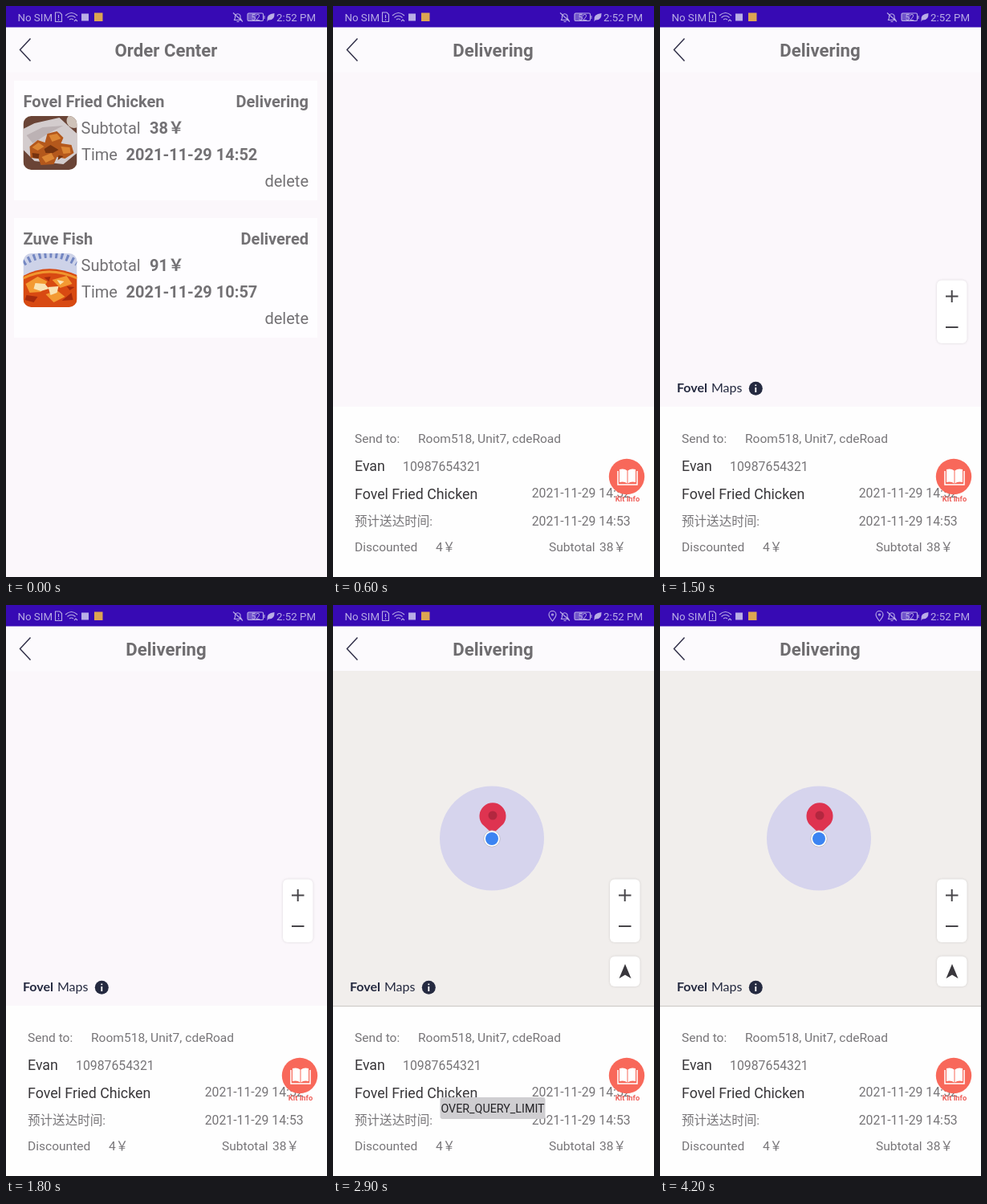
An HTML page that plays this animation: 400x711 px, repeating every 4.3 s.

```html
<!DOCTYPE html>
<html lang="en">
<head>
<meta charset="utf-8">
<title>Order tracking</title>
<style>
  html, body { margin: 0; height: 100%; overflow: hidden; background: #fbf7fb; }
  svg { display: block; width: 400px; height: 711px; font: 15.56px Roboto, "Noto Sans CJK SC", "Noto Sans CJK", sans-serif; fill: #777578; }
  text { white-space: pre; }
  .title { font-size: 22.2px; font-weight: 700; text-anchor: middle; fill: #6f6d70; }
  .card { font-size: 20px; fill: #737174; }
  .card rect { fill: #fefdff; }
  .bold { font-weight: 700; }
  .end { text-anchor: end; }
  .name { font-size: 17.8px; fill: #39373a; }
  .digits { font-size: 15.8px; }
  .status { font-size: 13.3px; fill: #b9ade6; }
  .line { fill: none; stroke: #b9ade6; stroke-width: 1.1; }
  .button { fill: #fff; filter: drop-shadow(0 0 1.5px #0002); }
</style>
</head>
<body>
<svg viewBox="0 0 400 711">
  <defs>
    <clipPath id="thumb"><rect width="67" height="67" rx="10"/></clipPath>
    <pattern id="grid" x="30.5" y="90" width="35.55" height="35.55" patternUnits="userSpaceOnUse">
      <path d="M.5 0V36M0 .5H36" stroke="#dedae0" fill="none"/>
    </pattern>
    <g id="chicken">
      <path d="M0 0H67V67H0z" fill="#6a4436"/>
      <path d="M0 16L14 9L45 2L58 14L67 22V46L50 60L14 56L0 42z" fill="#d3cccd"/>
      <path d="M4 24L24 14L50 12L34 20L12 34z" fill="#bcb2b4"/>
      <circle cx="63" cy="6" r="9" fill="#cfc2b8"/>
      <path d="M8 38L18 30L27 33L30 22L42 19L50 27L47 34L60 36L63 46L52 53L42 51L38 60L22 61L19 53L9 52z" fill="#b4581c"/>
      <path d="M11 39L19 33L26 38L18 43zM32 24L42 22L47 28L36 32zM47 38L58 39L59 46L50 47zM23 51L35 46L39 53L28 58z" fill="#dc8634"/>
      <path d="M26 41L34 36L44 42L37 46L28 46zM11 46L20 47L19 53L12 52zM44 49L50 50L43 55z" fill="#76330f"/>
    </g>
    <g id="fish">
      <path d="M0 0H67V67H0z" fill="#cdd2e8"/>
      <path d="M0 12Q33 -9 67 12" fill="none" stroke="#7487c2" stroke-width="8" stroke-dasharray="3 4"/>
      <path d="M0 28Q30 11 67 27V67H0z" fill="#d84a12"/>
      <path d="M0 31Q32 15 67 31" fill="none" stroke="#f0962e" stroke-width="3"/>
      <path d="M3 38L18 29L30 35L22 48L8 49zM36 33L54 28L61 38L46 43zM28 51L42 46L52 54L38 61z" fill="#f39a32"/>
      <path d="M15 37L27 38L32 44L22 47L13 44zM31 42L44 41L42 49L34 52zM42 33L51 35L46 39z" fill="#f9e3b4"/>
      <path d="M4 52L18 54L13 61L2 58zM48 59L60 49L62 58zM26 30L34 29L32 35zM54 41L64 42L58 46z" fill="#a62a0c"/>
    </g>
  </defs>

  <path d="M0 0H400V711H0z" fill="#fbf7fb"/>
  <path d="M0 26H400V82.500H0z" fill="#fcfafd"/>

  <g data-to="600">
    <text class="title" x="199.5" y="63">Order Center</text>
    <g id="cards"></g>
  </g>

  <g data-from="600">
    <text class="title" x="199.5" y="63">Delivering</text>
    <path data-from="800" data-to="1400" d="M0 83H400V499H0z" fill="url(#grid)"/>
    <g data-from="2000">
      <path d="M0 82H400V499H0z" fill="#f1eeec"/>
      <circle cx="198" cy="290.5" r="65" fill="#d6d4ed"/>
      <path d="M199 285L186 273A16.5 16.5 0 1 1 212 273z" fill="#de3350"/>
      <circle cx="199" cy="262" r="5.5" fill="#b3273f"/>
      <circle cx="198" cy="291" r="10.2" fill="#fff" stroke="#b9b5bd" stroke-width=".8"/>
      <circle cx="198" cy="291" r="8" fill="#3b84f2"/>
      <rect class="button" x="345" y="437.5" width="37.5" height="37.5" rx="6"/>
      <path d="M364 447L371.5 465L364 460.5L356.5 465z" fill="#39373c"/>
    </g>
    <g data-from="1400">
      <rect class="button" x="345" y="341.5" width="37.5" height="78.5" rx="6"/>
      <path d="M356 361.5H371.5M363.7 354V369M356 400H371.5" stroke="#48464a" stroke-width="2"/>
      <g font-family="Lato, sans-serif" font-size="16" fill="#252a40">
        <text class="bold" x="21" y="481">Fovel</text><text x="64" y="481">Maps</text>
      </g>
      <circle cx="119.3" cy="476.3" r="8.5" fill="#252a40"/>
      <path d="M119.3 475V481M119.3 471.5V473.3" stroke="#fff" stroke-width="1.8"/>
    </g>

    <path d="M0 499H400V711H0z" fill="#fefefe"/>
    <path data-from="2000" d="M0 499.5H400" stroke="#cac7c3"/>
    <text x="27" y="544">Send to:</text><text x="106" y="544">Room518, Unit7, cdeRoad</text>
    <text class="name" x="27" y="579">Evan</text><text class="digits" x="87" y="578.5">10987654321</text>
    <text class="name" x="27" y="614">Fovel Fried Chicken</text><text class="digits" x="247.7" y="612">2021-11-29 14:52</text>
    <text x="27" y="647">预计送达时间:</text><text class="digits" x="247.7" y="647">2021-11-29 14:53</text>
    <text x="27" y="679">Discounted</text><text x="128" y="679">4￥</text>
    <text x="269" y="679">Subtotal</text><text x="332" y="679">38￥</text>

    <circle cx="366" cy="586" r="22.2" fill="#f8685a"/>
    <path d="M355 579V596H379V579" fill="none" stroke="#fff" stroke-width="1.5"/>
    <path d="M357 577Q363 575.5 366.5 578.5V594.5Q363 591.5 357 593zM377 577Q371 575.5 367.5 578.5V594.5Q371 591.5 377 593z" fill="#fff"/>
    <text class="bold" x="367" y="617" font-size="9.3" text-anchor="middle" fill="#ee5f5a">Kit Info</text>

    <g data-from="2600" data-to="4100">
      <rect x="133.5" y="613" width="131" height="27" rx="3" fill="#cfced1"/>
      <text x="199" y="632" font-size="14.3" text-anchor="middle" fill="#242326">OVER_QUERY_LIMIT</text>
    </g>
  </g>

  <path d="M30.5 40.5L17.5 54.5L30.5 68.5" fill="none" stroke="#33314a" stroke-width="1.5"/>

  <path d="M0 0H400V26.5H0z" fill="#370ab4"/>
  <g class="status">
    <text x="14.5" y="18.5">No SIM</text>
    <text class="end" x="386" y="18.5">2:52 PM</text>
    <path d="M94 9.5H103V18.5H94z"/>
    <path d="M325.5 18Q324 10 334.5 9Q335 18 327 17.5L325 19.5z"/>
    <path d="M301 9H311.500V18.5H301z" opacity=".45"/>
    <text x="311" y="17.5" font-size="10" text-anchor="middle">52</text>
    <g class="line">
      <path d="M61.5 8H67L69.5 10.5V19.5H61.5zM65.5 11V15M65.5 16.500V18"/>
      <path d="M74 12Q81.5 5 89 12M76.5 14.5Q81.5 10 86.5 14.5M79 17Q81.5 15 84 17"/>
      <path d="M85 19L87 17L89 19"/>
      <path d="M284.5 17.5H293.5L292 15V12A3.5 3.5 0 0 0 285.5 12V15zM287.5 19.5H290.5M283 8.5L295 19.5"/>
      <rect x="301" y="9" width="19.5" height="9.5" rx="1.5"/><path d="M322 12V16"/>
      <g data-from="2000">
        <path d="M273.5 20Q269 14.5 269 12A4.5 4.5 0 0 1 278 12Q278 14.5 273.5 20z"/>
        <circle cx="273.5" cy="12" r="1"/>
      </g>
    </g>
    <path d="M110 8.5H120.5V19H110z" fill="#dca552"/>
  </g>
</svg>
<script>
const card = (y, shop, state, price, time, photo) => `
  <g class="card" transform="translate(0 ${y})">
    <rect x="10" width="378" height="149"/>
    <text class="bold" x="21.5" y="33">${shop}</text>
    <text class="bold end" x="377" y="33">${state}</text>
    <g transform="translate(21.5 44)" clip-path="url(#thumb)"><use href="#${photo}"/></g>
    <text x="93.5" y="66">Subtotal</text><text class="bold" x="179" y="66">${price}￥</text>
    <text x="94" y="99">Time</text><text class="bold" x="149.5" y="99">2021-11-29 ${time}</text>
    <text class="end" x="377" y="132">delete</text>
  </g>`;

document.getElementById('cards').innerHTML =
  card(93, 'Fovel Fried Chicken', 'Delivering', 38, '14:52', 'chicken') +
  card(264, 'Zuve Fish', 'Delivered', 91, '10:57', 'fish');

const LOOP = 4300;
const timed = [...document.querySelectorAll('[data-from], [data-to]')].map(node => ({
  node, from: +(node.dataset.from ?? 0), to: +(node.dataset.to ?? LOOP)
}));

function draw() {
  const t = performance.now() % LOOP;
  for (const { node, from, to } of timed) node.style.display = t >= from && t < to ? '' : 'none';
  requestAnimationFrame(draw);
}
draw();
</script>
</body>
</html>
```
